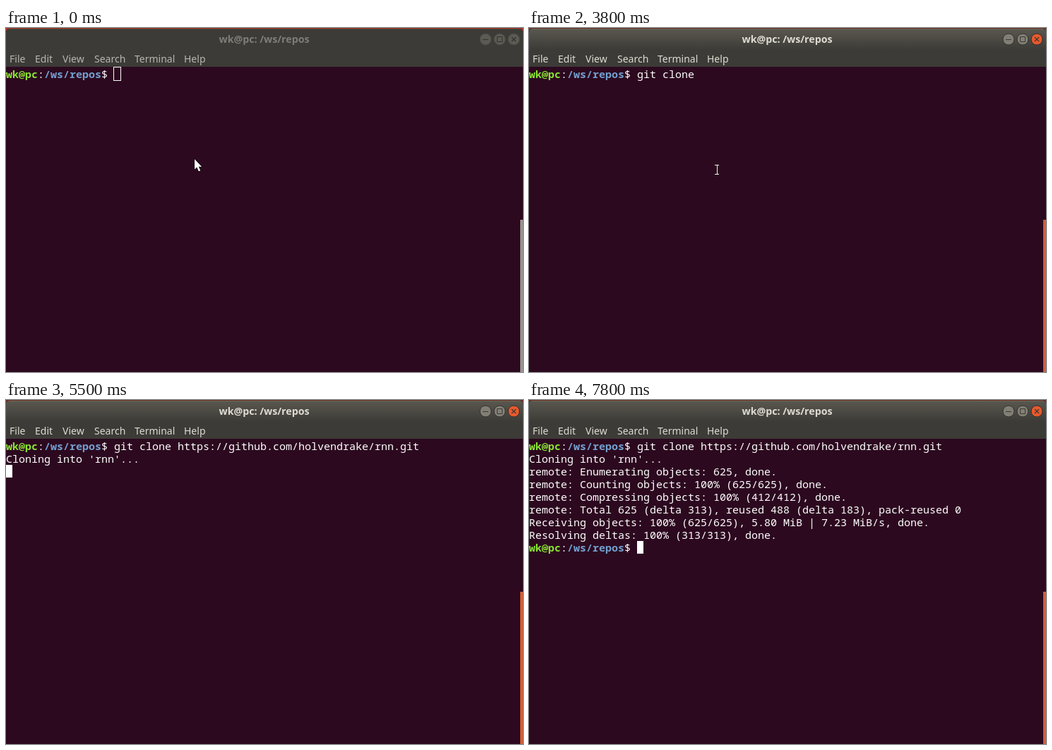
Animation of 732 by 488 pixels, one loop 8 s. Source, as an HTML page with a canvas:

```html
<!DOCTYPE html>
<html lang="en">
<head>
<meta charset="utf-8">
<title>Terminal: git clone</title>
<style>
  html, body { margin: 0; width: 100%; height: 100%; overflow: hidden; background: #2c091f; }
  canvas { display: block; }
</style>
</head>
<body>
<canvas id="stage" width="732" height="488"></canvas>
<script>
const ctx = document.getElementById('stage').getContext('2d');
const LOOP = 8000, COL = 9, ROW = 18, TOP = 56;
const MONO = '15px "Noto Sans Mono", monospace';
const UI = '14px "Noto Sans", sans-serif';
const BG = '#2c091f', PANEL = '#3c3b37', WHITE = '#ffffff';

const USER = 'wk@pc', PATH = '/ws/repos', PROMPT = `${USER}:${PATH}$ `;
const URL_TEXT = 'https://github.com/holvendrake/rnn.git';

// Every step changes only the listed parts of the screen.
const steps = [];
let state = { active: false, lines: [PROMPT], cursor: null, pointer: null, menu: null };
function at(time, change) {
  state = { ...state, ...change };
  steps.push({ time, ...state });
}
function cursor(col, row = 0, hollow = false) { return { col, row, hollow }; }
function pointer(kind, x, y) { return { kind, x, y }; }
function type(time, text) {
  at(time, { lines: [PROMPT + text], cursor: cursor(PROMPT.length + text.length) });
}
function print(time, head, tail, cursorRow) {
  at(time, { lines: [...head, ...tail], cursor: cursorRow === undefined ? null : cursor(0, cursorRow) });
}

at(0, { cursor: cursor(17, 0, true), pointer: pointer('arrow', 267, 186) });
at(100, { pointer: pointer('beam', 267, 187) });
at(400, { active: true, cursor: cursor(17) });
at(900, { cursor: null });
at(1200, { cursor: cursor(17), pointer: null });
type(1400, 'gi');
type(1500, 'git ');
type(1700, 'git c');
type(1900, 'git cl');
type(2100, 'git clo');
type(2200, 'git clon');
type(2400, 'git clone');
type(2500, 'git clone ');
at(3300, { cursor: null });
at(3700, { pointer: pointer('beam', 267, 200) });
at(3800, { pointer: pointer('beam', 266, 201) });
at(3900, { pointer: pointer('arrow', 263, 207), menu: 'open', cursor: cursor(27, 0, true) });
at(4200, { pointer: pointer('arrow', 318, 382), menu: 'Show Menubar' });
at(4300, { pointer: pointer('arrow', 333, 312), menu: 'Preferences' });
at(4400, { pointer: pointer('arrow', 336, 266), menu: 'Paste' });
at(4700, { menu: null, cursor: cursor(27) });
type(5000, 'git clone ' + URL_TEXT);
at(5000, { pointer: pointer('beam', 337, 268) });
at(5300, { pointer: null });

const cmd = [PROMPT + 'git clone ' + URL_TEXT];
print(5400, cmd, [], 1);
const cloning = [...cmd, "Cloning into 'rnn'..."];
print(5500, cloning, [], 2);
const listed = [...cloning, 'remote: Enumerating objects: 625, done.'];
print(6400, listed, [], 3);
const counted = [...listed, 'remote: Counting objects: 100% (625/625), done.'];
print(6500, counted, [], 4);
print(6600, counted, ['remote: Compressing objects:  24% (99/412)'], 4);
const packed = [...counted, 'remote: Compressing objects: 100% (412/412), done.'];
print(6700, packed, [], 5);
const receiving = (percent, rest) => 'Receiving objects: ' + `${percent}% `.padStart(5) + rest;
print(6800, packed, [receiving(0, '(1/625)')], 5);
print(7000, packed, [receiving(13, '(82/625)')], 5);
print(7100, packed, [receiving(43, '(269/625)')], 5);
print(7200, packed, [receiving(62, '(388/625), 4.11 MiB | 8.20 MiB/s')], 5);
const total = [...packed, 'remote: Total 625 (delta 313), reused 488 (delta 183), pack-reused 0'];
print(7400, total, [receiving(100, '(625/625), 5.80 MiB | 7.23 MiB/s')], 6);
const done = [...total, receiving(100, '(625/625), 5.80 MiB | 7.23 MiB/s, done.'),
  'Resolving deltas: 100% (313/313), done.'];
print(7500, done, []);
at(7800, { lines: [...done, PROMPT], cursor: cursor(17, 8) });

function rect(x, y, w, h, fill) {
  ctx.fillStyle = fill;
  ctx.fillRect(x, y, w, h);
}
function text(str, x, y, fill, font = UI, align = 'left') {
  ctx.font = font;
  ctx.fillStyle = fill;
  ctx.textAlign = align;
  ctx.fillText(str, x, y);
}
function stroke(points, color, width = 1) {
  ctx.beginPath();
  points.forEach(([x, y]) => ctx.lineTo(x, y));
  ctx.strokeStyle = color;
  ctx.lineWidth = width;
  ctx.stroke();
}
function gradient(y0, y1, from, to) {
  const g = ctx.createLinearGradient(0, y0, 0, y1);
  g.addColorStop(0, from);
  g.addColorStop(1, to);
  return g;
}

function drawButton(x, fill, edge, ink, glyph) {
  ctx.beginPath();
  ctx.arc(x, 16, 8, 0, Math.PI * 2);
  ctx.fillStyle = fill;
  ctx.fill();
  ctx.strokeStyle = edge;
  ctx.lineWidth = 1;
  ctx.stroke();
  if (glyph === 'min') stroke([[x - 4, 16.5], [x + 4, 16.5]], ink);
  if (glyph === 'max') {
    ctx.strokeStyle = ink;
    ctx.strokeRect(x - 3.5, 12.5, 7, 7);
  }
  if (glyph === 'close') {
    stroke([[x - 3, 13], [x + 3, 19]], ink, 1.3);
    stroke([[x + 3, 13], [x - 3, 19]], ink, 1.3);
  }
}

function drawWindow(active) {
  rect(0, 0, 732, 488, BG);
  rect(0, 0, 732, 4, active ? '#6b2c20' : '#a8321f');
  ctx.beginPath();
  ctx.roundRect(0, 1, 732, 54, [5, 5, 0, 0]);
  ctx.fillStyle = active ? gradient(1, 31, '#5a584f', PANEL) : PANEL;
  ctx.fill();
  rect(4, 1, 724, 1, active ? '#69675d' : '#4a4943');
  text(`${USER}: ${PATH}`, 365.5, 21, active ? '#dfdbd2' : '#807d78',
    'bold 14.2px "Noto Sans", sans-serif', 'center');

  const fill = active ? '#817f75' : '#5b5a53';
  const edge = active ? '#33322e' : '#4b4a44';
  const ink = active ? '#3a3934' : '#34332f';
  drawButton(679, fill, edge, ink, 'min');
  drawButton(699, fill, edge, ink, 'max');
  drawButton(719, active ? '#e9592c' : fill, edge, ink, 'close');

  const labels = { File: 5, Edit: 41, View: 80, Search: 125, Terminal: 182, Help: 252 };
  for (const label in labels) text(label, labels[label], 49, active ? '#dfdbd2' : '#b9b6ae');
  rect(728, 272, 4, 216, active ? '#cf5f3b' : '#97938e');
}

function drawLine(line, row) {
  const y = TOP + row * ROW + 15;
  const put = (str, col, color, bold) =>
    text(str, col * COL, y, color, (bold ? 'bold ' : '') + MONO);
  if (!line.startsWith(PROMPT)) return put(line, 0, WHITE);
  put(USER, 0, '#8ae234', true);
  put(':', 5, WHITE);
  put(PATH, 6, '#729fcf', true);
  put(line.slice(15), 15, WHITE);
}

function drawCursor({ col, row, hollow }, lines) {
  const x = col * COL, y = TOP + row * ROW;
  if (hollow) {
    ctx.strokeStyle = WHITE;
    ctx.lineWidth = 1;
    ctx.strokeRect(x - 0.5, y - 0.5, 10, 19);
    return;
  }
  rect(x, y, COL, ROW, WHITE);
  const char = (lines[row] || '')[col];
  if (char) text(char, x, y + 15, BG, MONO);
}

// Vertical centre of each context menu item.
const menuItems = {
  'Copy': 221, 'Copy as HTML': 244, 'Paste': 267, 'Read-Only': 293,
  'Preferences': 316, 'New Window': 342, 'New Tab': 365, 'Show Menubar': 391
};
function drawMenu(selected) {
  rect(264, 209, 137, 193, '#4a4943');
  rect(265, 210, 135, 191, PANEL);
  for (const y of [279, 328, 378]) rect(268, y, 129, 1, '#45443f');
  for (const label in menuItems) {
    const y = menuItems[label];
    if (label === selected) {
      const bottom = Math.min(y + 11, 400);
      rect(264, y - 12, 137, bottom - y + 12, gradient(y - 12, bottom, '#f17f57', '#df5c2f'));
    }
    text(label, 283, y + 5, label.startsWith('Copy') ? '#86837c' : label === selected ? WHITE : '#dfdbd2');
  }
  stroke([[272, 390], [275, 393.5], [281, 387.5]], '#eeebe4', 2.2);
}

function drawPointer({ kind, x, y }) {
  if (kind === 'beam') {
    const beam = [[-3, -7, 6], [-0.5, -7, 1, 14], [-3, 6, 6]];
    beam.forEach(([dx, dy, w, h = 1]) => rect(Math.round(x + dx), y + dy, w, h, '#f4f1f3'));
    return;
  }
  const shape = [[0, 0], [0, 14.5], [3.3, 11.5], [5.8, 17.3], [8.3, 16.2], [5.8, 10.7], [10.2, 10.7]];
  ctx.beginPath();
  shape.forEach(([dx, dy]) => ctx.lineTo(x + dx, y + dy));
  ctx.closePath();
  ctx.lineJoin = 'round';
  ctx.strokeStyle = '#16040f';
  ctx.lineWidth = 2;
  ctx.stroke();
  ctx.fillStyle = WHITE;
  ctx.fill();
}

function frame(now) {
  const t = now % LOOP;
  const s = steps.findLast(step => step.time <= t) || steps[0];
  drawWindow(s.active);
  s.lines.forEach(drawLine);
  if (s.cursor) drawCursor(s.cursor, s.lines);
  if (s.menu) drawMenu(s.menu);
  if (s.pointer) drawPointer(s.pointer);
  requestAnimationFrame(frame);
}
requestAnimationFrame(frame);
</script>
</body>
</html>
```
